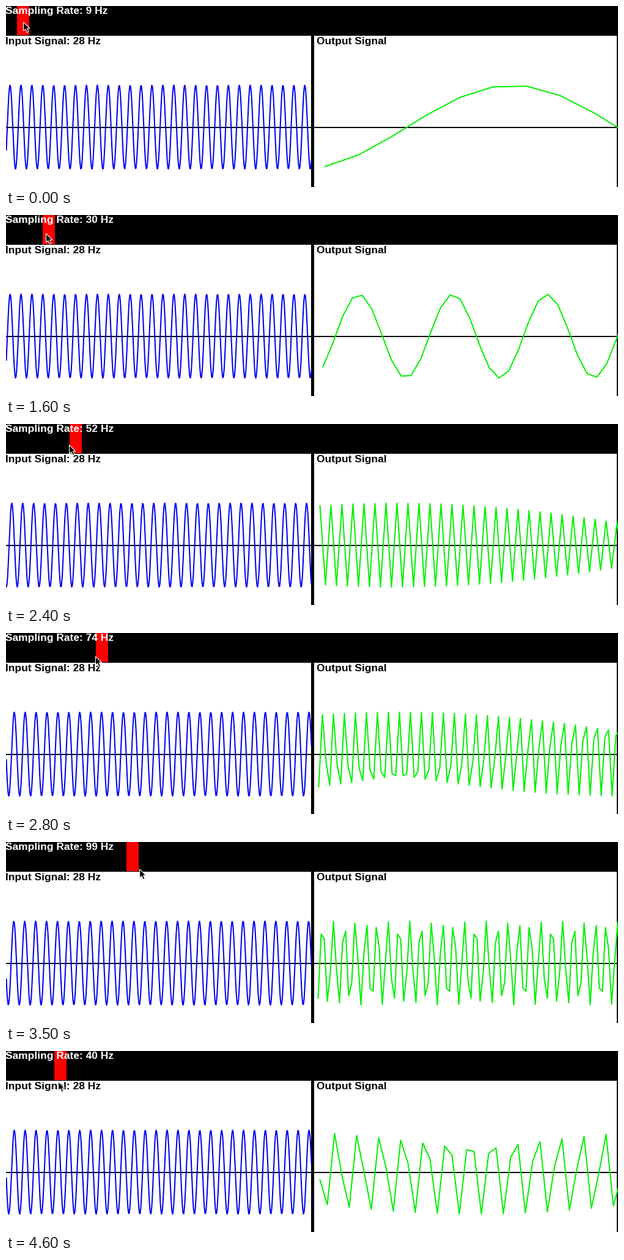
Write a matplotlib script that moves like this. It is 1001 px wide and 298 px high and loops after 4700 ms.

```python
import numpy as np
import matplotlib.pyplot as plt
from matplotlib.animation import FuncAnimation
from matplotlib.patches import Polygon, Rectangle

W, H, DPI = 1001, 298, 100
PX = 72 / DPI
FRAMES, INTERVAL = 47, 100

SIGNAL_HZ = 28
PANEL = 500
PERIOD = PANEL / SIGNAL_HZ
MID, AMP = 199.4, 69.0
OUT_X = 505

# Knots of the motion, in animation steps
STEP = np.array([3, 9, 16, 24, 32, 39, 46])
RATE = np.array([9, 17, 30, 52, 99, 76.5, 39.5])
SLOPE = np.array([0, 2, 2.5, 5.5, 7.5, -1.5, 2])
CREST = np.array([6.1, 10.5, 6.2, 9, 17, 17.9, 13]) + PERIOD * np.array([0, 3, 7, 11, 15, 19, 23])
FIRST = np.array([16, 17, 13, 8, 5, 5.5, 8])
MOUSE_Y = np.array([26, 27, 30, 34, 42, 47, 50])

ARROW = np.array([(0, 0), (0, 14.5), (3.3, 11.5), (5.8, 17), (8.4, 16), (6, 10.4), (10.3, 10.4)])


def slider(step):
    """Sampling rate and its change per step (cubic Hermite)."""
    i = min(np.searchsorted(STEP, step, side="right") - 1, len(STEP) - 2)
    span = STEP[i + 1] - STEP[i]
    u = (step - STEP[i]) / span
    a, b = RATE[i], RATE[i + 1]
    m, n = SLOPE[i] * span, SLOPE[i + 1] * span
    c3, c2 = 2 * a - 2 * b + m + n, 3 * (b - a) - 2 * m - n
    return ((c3 * u + c2) * u + m) * u + a, ((3 * c3 * u + 2 * c2) * u + m) / span


def wave(x, crest):
    return MID - AMP * np.cos(2 * np.pi * (x - crest) / PERIOD)


fig = plt.figure(figsize=(W / DPI, H / DPI), dpi=DPI, facecolor="black")
ax = fig.add_axes([0, 0, 1, 1])
ax.set(xlim=(0, W), ylim=(H, 0))
ax.axis("off")


def box(x, y, w, h, color):
    return ax.add_patch(Rectangle((x, y), w, h, fc=color, lw=0, antialiased=False))


def label(x, y, text, color):
    return ax.text(x, y, text, color=color, family="Liberation Sans", weight="bold",
                   size=17.4 * PX, va="baseline", zorder=5)


box(0, 49, 499, H - 49, "white")
box(504, 49, 495, H - 49, "white")
box(0, 199, W, 2, "black")
handle = box(0, 0, 20, 48, "red")

signal, = ax.plot([], [], color="#0000f0", lw=2 * PX, zorder=3)
output, = ax.plot([], [], color="#00f000", lw=2 * PX, zorder=3)

rate_label = label(-1, 13, "", "white")
label(-1, 63, f"Input Signal: {SIGNAL_HZ} Hz", "black")
label(507.5, 63, "Output Signal", "black")
mouse = ax.add_patch(Polygon(ARROW, fc="black", ec="white", lw=1.1 * PX, zorder=6))


def update(frame):
    step = max(frame, STEP[0])
    rate, speed = slider(step)
    crest = np.interp(step, STEP, CREST)

    handle.set_x(round(2 * rate))
    rate_label.set_text(f"Sampling Rate: {int(rate + 0.5)} Hz")
    # The pointer trails the handle
    tip = 2 * rate + 10 - 2 * speed, np.interp(step, STEP, MOUSE_Y)
    mouse.set_xy(ARROW + np.array(tip) + 0.5)

    x = np.arange(PANEL)
    signal.set_data(x + 0.5, wave(x, crest))

    gap = int(PANEL / rate)
    x = np.arange(round(np.interp(step, STEP, FIRST)), PANEL + gap, gap)
    output.set_data(x + OUT_X + 0.5, wave(x, crest))
    return handle, rate_label, mouse, signal, output


anim = FuncAnimation(fig, update, frames=FRAMES, interval=INTERVAL, repeat=True, repeat_delay=0)
plt.show()
```
